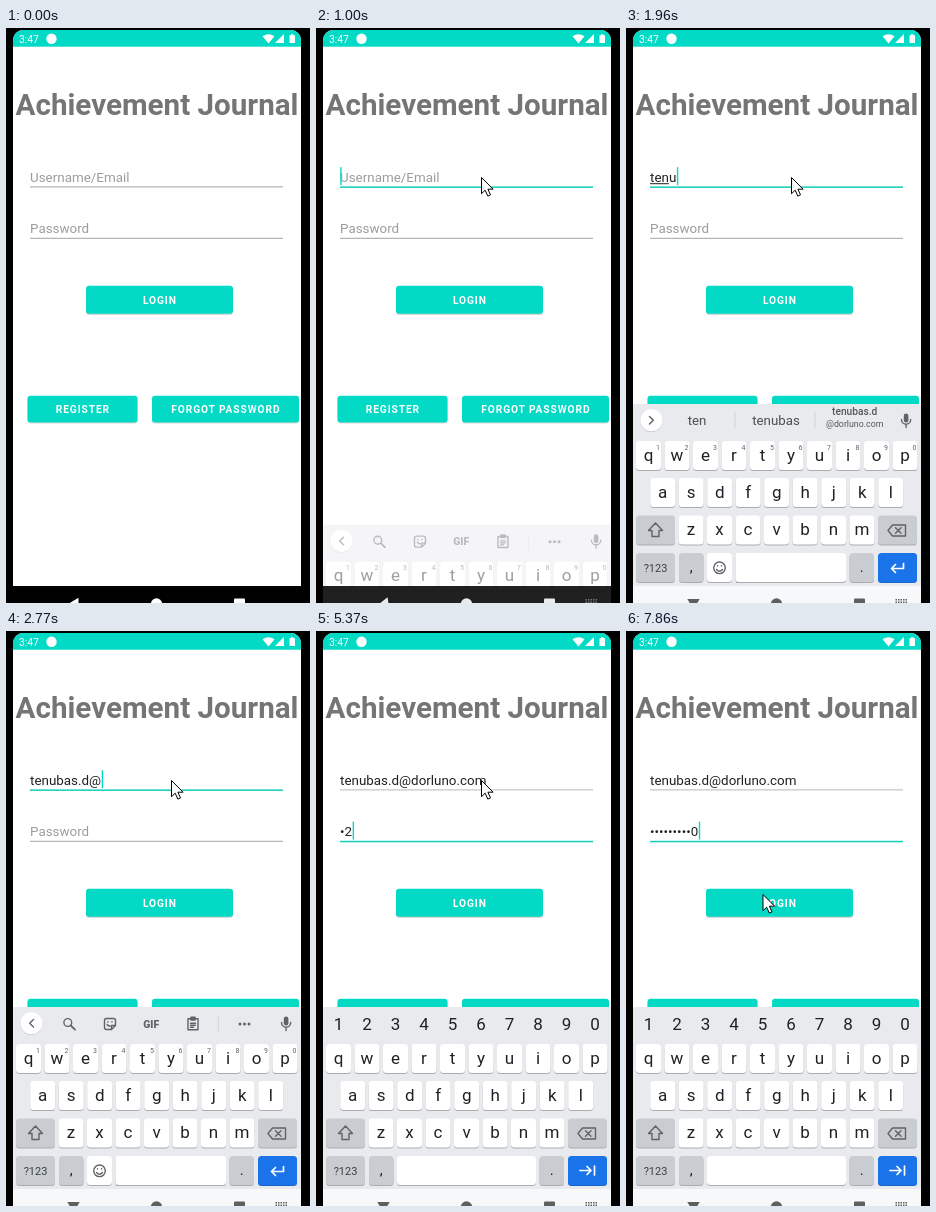
Recreate the animation shown at these times as an HTML page. Size 304 by 575 pixels, loop 7.99 s.

```html
<!DOCTYPE html>
<html lang="en">
<head>
<meta charset="utf-8">
<title>Login screen</title>
<style>
html, body { margin: 0; width: 100%; height: 100%; overflow: hidden; background: #000; }
svg { display: block; width: 304px; height: 575px; }
text { font-family: Roboto, "Noto Sans", sans-serif; }
.mid { text-anchor: middle; }
.line { fill: none; stroke: #5f6368; stroke-width: 1.4; stroke-linejoin: round; stroke-linecap: round; }
</style>
</head>
<body>
<svg id="stage" viewBox="0 0 304 575">
  <defs>
    <clipPath id="glass"><path d="M7 575V12a10 10 0 0 1 10-10H285a10 10 0 0 1 10 10V575Z"/></clipPath>
  </defs>
  <rect width="304" height="575"/>
  <g clip-path="url(#glass)">
    <rect x="7" y="2" width="288" height="573" fill="#fff"/>
    <g id="app"></g>
    <g id="board"></g>
    <rect id="navBack" x="7" y="558" width="288" height="17"/>
    <g id="nav">
      <path id="back" d="M62 576 72.500 569.800V582.200Z"/>
      <circle cx="150.500" cy="576" r="5.700"/>
      <rect x="228" y="570.500" width="11" height="11" rx="1"/>
      <path id="switcher" d="M269.500 571.700h12M269.500 574.200h12" fill="none" stroke-width="1.400" stroke-dasharray="1.500 1"/>
    </g>
  </g>
  <path id="mouse" d="M0 0V16.200L3.700 12.700 6.300 18.600 9 17.400 6.400 11.700H11.600Z" fill="#fff" stroke="#000" stroke-width="1" stroke-linejoin="round"/>
</svg>
<script>
const LOOP = 7990, TEAL = '#03dac5', INK = '#202124', ICON = '#5f6368', PANEL = '#e8eaed', GREY = '#c9cdd2';
const NAME = 'tenubas', HOST = '@dorluno.com', MAIL = NAME + '.d' + HOST, PIN = '1234567890';
// Moment at which each character of the two fields appears
const MAIL_AT = [1620, 1700, 1830, 1960, 2110, 2240, 2370, 2440, 2570, 2770,
  3040, 3170, 3240, 3370, 3640, 3770, 3900, 4110, 4300, 4430, 4500];
const PIN_AT = [5370, 5370, 5500, 5770, 5900, 5970, 6230, 6300, 6370, 6700];
const FOCUS_MAIL = 870, FOCUS_PIN = 4630, DIGITS_AT = 4700;

const $ = id => document.getElementById(id);
function el(parent, tag, attrs, content) {
  const node = document.createElementNS('http://www.w3.org/2000/svg', tag);
  set(node, attrs);
  if (content !== undefined) node.textContent = content;
  return parent.appendChild(node);
}
function set(node, attrs) {
  for (const k in attrs) node.setAttribute(k, attrs[k]);
}
function box(parent, x, y, w, h, fill, rx = 0) {
  return el(parent, 'rect', { x, y, width: w, height: h, fill, rx });
}
function label(parent, x, y, size, fill, content, more = {}) {
  return el(parent, 'text', { x, y, 'font-size': size, fill, ...more }, content);
}
function mid(parent, x, y, size, fill, content, more = {}) {
  return label(parent, x, y, size, fill, content, { class: 'mid', ...more });
}
function line(parent, d, more = {}) {
  return el(parent, 'path', { d, class: 'line', ...more });
}
function show(node, on) { node.style.display = on ? '' : 'none'; }

// ---- app page
const app = $('app');
box(app, 7, 2, 288, 16.7, TEAL);
label(app, 13, 14.6, 10.3, '#fff', '3:47');
el(app, 'circle', { cx: 45.5, cy: 10.8, r: 5.2, fill: '#fff' });
el(app, 'path', { d: 'M256.500 8.300Q262.500 4 268.500 8.300L262.500 15.400ZM278 6V15H269ZM283.500 7.200H285V6.200H287.500V7.200H289V15H283.500Z', fill: '#fff' });
mid(app, 151, 87, 29.6, '#757575', 'Achievement Journal', { 'font-weight': 700 });

function button(x, y, w, h, caption) {
  box(app, x, y + 1.2, w, h, '#000', 3).setAttribute('opacity', .16);
  box(app, x, y, w, h, TEAL, 3);
  mid(app, x + w / 2 + .4, y + h / 2 + 3.7, 10.2, '#fff', caption, { 'font-weight': 600, 'letter-spacing': .92 });
}
button(80, 257.8, 147, 28, 'LOGIN');
button(21.5, 367.7, 110, 26.7, 'REGISTER');
button(146, 367.7, 147, 26.7, 'FORGOT PASSWORD');

function field(base, hint) {
  return {
    base,
    hint: label(app, 24, base, 13.4, '#9c9c9c', hint),
    rule: box(app, 24, base + 4.8, 253, 1, '#a3a3a3'),
    text: label(app, 24, base, 13.4, INK, ''),
    caret: box(app, 24, base - 14.4, 1.4, 18, TEAL)
  };
}
const mail = field(153.6, 'Username/Email'), pin = field(205, 'Password');
const compose = box(app, 24, 155.2, 0, 1, INK);

// ---- keyboard
const board = $('board');
box(board, 7, 376, 288, 400, PANEL);
box(board, 7, 558, 288, 200, '#f7f8f9');

function key(parent, x, y, w, fill = '#fff', shadow = '#a9adb2') {
  box(parent, x, y + 1, w, 29, shadow, 3.5);
  box(parent, x, y, w, 29, fill, 3.5);
}
const PITCH = 28.5;
function row(letters, first, y) {
  [...letters].forEach((c, i) => {
    const x = first + i * PITCH;
    key(board, x - 12.5, y, 25);
    mid(board, x, y + 19.8, 17, INK, c);
  });
}
row('qwertyuiop', 22.5, 413);
row('asdfghjkl', 36.7, 450);
row('zxcvbnm', 65, 487.5);
key(board, 10, 487.5, 39, GREY);
key(board, 252, 487.5, 39, GREY);
line(board, 'M29.500 495 22.500 502.500H26V508.500H33V502.500H36.500Z');
line(board, 'M262 502.500 266.500 497H279.500V508H266.500ZM269.500 499.800 275 505.200M275 499.800 269.500 505.200');
key(board, 10, 525, 39, GREY);
mid(board, 29.5, 543.8, 11, '#3c4043', '?123');
key(board, 53, 525, 24.5, GREY);
mid(board, 65.3, 544, 15, INK, ',');
key(board, 81, 525, 139);
key(board, 223.5, 525, 24.5, GREY);
mid(board, 235.8, 544, 15, INK, '.');
key(board, 252, 525, 39, '#1a73e8', '#1765cc');
const onBlue = { style: 'stroke:#fff;stroke-width:1.7' };
const enter = line(board, 'M277.500 535.500V540.500H265.500M269.500 536.500 265.500 540.500 269.500 544.500', onBlue);
const next = line(board, 'M264 539.500H275M271 535.500 275 539.500 271 543.500M278.500 535V544', onBlue);

// Parts that only the text or only the password layout has
const extras = el(board, 'g', {}), numbers = el(board, 'g', {});
[...PIN].forEach((c, i) => {
  mid(extras, 32 + i * PITCH, 421.5, 7, ICON, c);
  mid(numbers, 22.5 + i * PITCH, 399, 17, INK, c);
});
// Emoji key
box(extras, 80, 524, 30, 32, PANEL);
key(extras, 81, 525, 25);
key(extras, 109.5, 525, 110.5);
el(extras, 'circle', { cx: 93.5, cy: 539.8, r: 5.8, class: 'line' });
line(extras, 'M90.500 541.500Q93.500 545 96.500 541.500M91.500 537.800V538M95.500 537.800V538');

// Strip above the letters
el(extras, 'circle', { cx: 25.5, cy: 393, r: 11, fill: '#c5c8cc' });
el(extras, 'circle', { cx: 25.5, cy: 392.3, r: 11, fill: '#fff' });
const chevron = line(extras, 'M2 -3.700 -1.800 0 2 3.700');
box(extras, 277.8, 385.5, 4.6, 9, ICON, 2.3);
line(extras, 'M275.500 391.500a4.600 4.600 0 0 0 9.200 0M280.100 396.200V399.500');

const tools = el(extras, 'g', {});
el(tools, 'circle', { cx: 61.8, cy: 391.5, r: 3.9, class: 'line' });
line(tools, 'M64.800 394.500 69 398.700', { style: 'stroke-width:1.8' });
line(tools, 'M100.500 387.500H107.500Q109.500 387.500 109.500 389.500V394.500L105.500 398.500H100.500Q98.500 398.500 98.500 396.500V389.500Q98.500 387.500 100.500 387.500ZM109 394.500H105.500V398M101.300 393.500Q102.500 395.300 104 395M102 390.700V391M106 390.700V391');
mid(tools, 145.2, 396.6, 10.4, ICON, 'GIF', { 'font-weight': 900 });
line(tools, 'M182 387.800H192V398.800H182ZM184.500 392.200H189.500M184.500 394.200H189.500M184.500 396.200H187.500');
box(tools, 184.2, 385.5, 5.6, 4.2, ICON, 1);
box(tools, 211.8, 385, 1, 16, '#cfd2d6');
for (const x of [234, 238.5, 243]) el(tools, 'circle', { cx: x, cy: 393, r: 1.5, fill: ICON });

const hints = el(extras, 'g', {});
const prefix = mid(hints, 71, 397, 13.3, '#4b4e52', '');
mid(hints, 150, 397, 13.3, '#4b4e52', NAME);
mid(hints, 228.7, 387, 10.2, '#55585c', NAME + '.d', { 'font-weight': 500 });
mid(hints, 228.7, 399, 8.8, '#55585c', HOST);
for (const x of [108.5, 188.5]) box(hints, x, 384, 1, 16, '#cfd2d6');

// ---- timing
function track(t, keys) {
  if (t <= keys[0][0]) return keys[0][1];
  for (let i = 1; i < keys.length; i++) {
    const [a, u] = keys[i - 1], [b, v] = keys[i];
    if (t < b) return u + (v - u) * (t - a) / (b - a);
  }
  return keys[keys.length - 1][1];
}
const count = (times, t) => times.filter(at => at <= t).length;
const smooth = x => x * x * (3 - 2 * x);
const ramp = (t, a, b) => Math.min(1, Math.max(0, (t - a) / (b - a)));

function drawField(f, t, text, focused, visited, edited) {
  f.text.textContent = text;
  show(f.hint, !text);
  set(f.rule, {
    fill: focused ? '#12cdb9' : visited ? '#b2bbba' : '#a3a3a3',
    height: focused ? 1.5 : 1
  });
  show(f.caret, focused && (t - edited) % 1000 < 470);
  f.caret.setAttribute('x', 24.2 + (text ? f.text.getComputedTextLength() + .4 : 0));
}

function drawFields(t) {
  const n = count(MAIL_AT, t), m = count(PIN_AT, t);
  const onPin = t >= FOCUS_PIN, onMail = t >= FOCUS_MAIL && !onPin;
  drawField(mail, t, MAIL.slice(0, n), onMail, onPin, n ? MAIL_AT[n - 1] : FOCUS_MAIL);
  const masked = m ? '•'.repeat(m - 1) + PIN[m - 1] : '';
  drawField(pin, t, masked, onPin, false, m ? PIN_AT[m - 1] : FOCUS_PIN);

  // The word under composition trails the typing a little
  const typed = Math.min(NAME.length, count(MAIL_AT, t - 75));
  const composing = n > 0 && n <= NAME.length && typed > 0;
  show(compose, composing);
  if (composing) compose.setAttribute('width', mail.text.getSubStringLength(0, typed));
  prefix.textContent = NAME.slice(0, typed);
  show(hints, composing);
  show(tools, !composing);
  chevron.setAttribute('transform', `translate(25.500 392.300) scale(${composing ? -1 : 1} 1)`);
}

function drawBoard(t) {
  const drop = track(t, [[920, 182], [1000, 122], [1070, 28], [1130, 0]]);
  const fade = track(t, [[920, 0], [1000, .42], [1070, .82], [1130, 1]]);
  show(board, fade > 0);
  set(board, { transform: `translate(0 ${drop})`, opacity: fade });
  const digits = t >= DIGITS_AT;
  show(extras, !digits);
  show(numbers, digits);
  show(enter, !digits);
  show(next, digits);

  const light = track(t, [[930, 0], [1000, .12], [1110, 1]]);
  $('navBack').setAttribute('opacity', 1 - light);
  const shade = Math.round(255 - 160 * light), tone = `rgb(${shade},${shade},${shade})`;
  $('nav').setAttribute('fill', tone);
  set($('switcher'), { stroke: tone, opacity: track(t, [[930, 0], [1000, .4], [1130, 1]]) });
  const turn = track(t, [[930, 0], [1000, 8], [1130, 45], [1270, 90]]);
  $('back').setAttribute('transform', `rotate(${-turn} 67.500 576)`);
}

function drawMouse(t) {
  const enterIn = 1 - (1 - ramp(t, 70, 470)) ** 2;
  const settle = ramp(t, 720, 800), leave = smooth(ramp(t, 7340, 7860));
  const x = 289 - 129 * enterIn + 5.5 * settle - 28.5 * leave;
  const y = 549 - 397 * enterIn - 2.5 * settle + 114 * leave;
  show($('mouse'), t >= 70);
  $('mouse').setAttribute('transform', `translate(${x} ${y})`);
}

function draw(t) {
  drawFields(t);
  drawBoard(t);
  drawMouse(t);
}

const start = performance.now();
function tick() {
  draw((performance.now() - start) % LOOP);
  requestAnimationFrame(tick);
}
tick();
</script>
</body>
</html>
```
